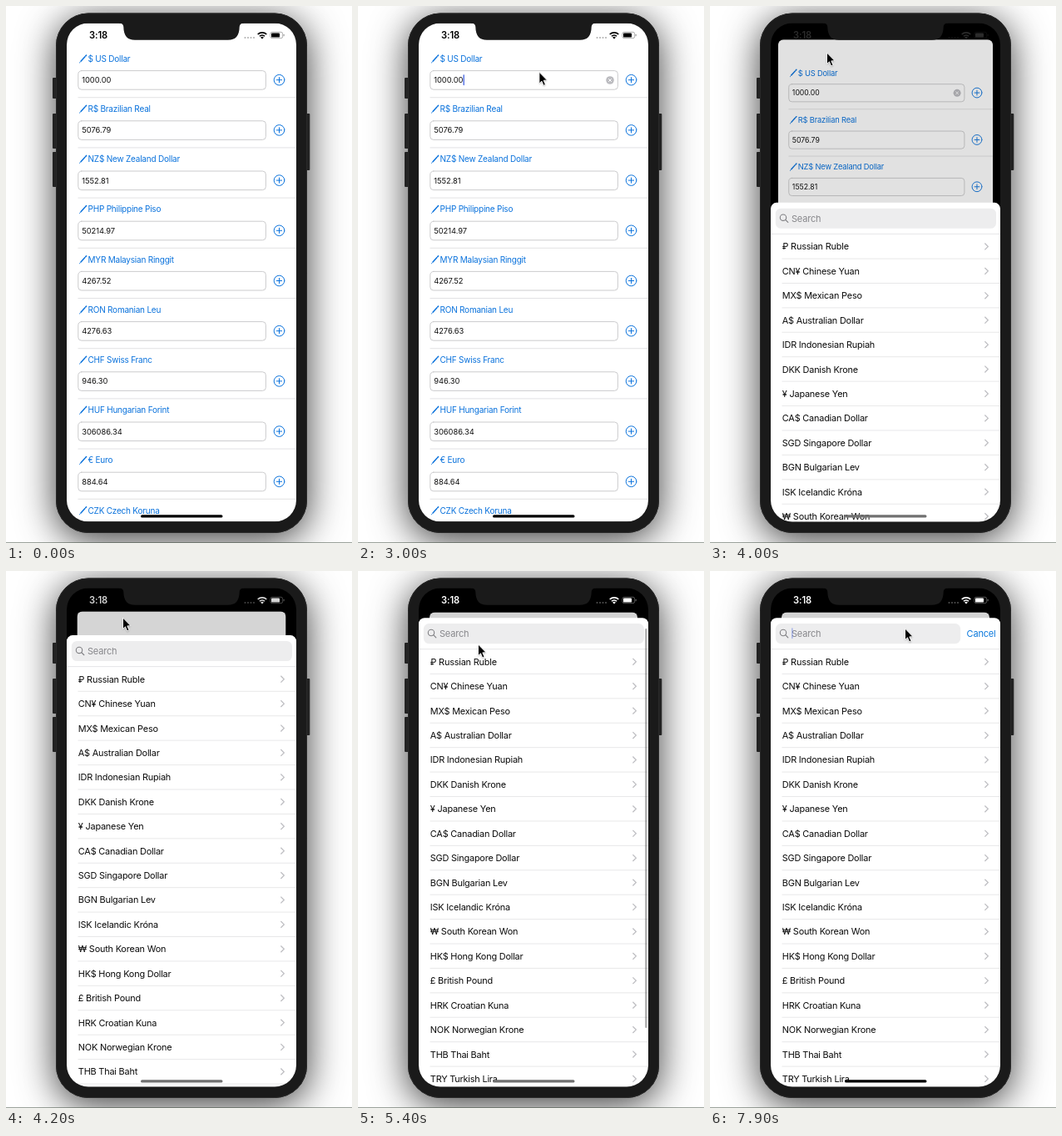
Write an HTML page with a canvas that moves like this. It is 416x644 px and loops after 8 s.

```html
<!DOCTYPE html>
<html lang="en">
<head>
<meta charset="utf-8">
<title>Currency list</title>
<style>
html, body { margin: 0; width: 100%; height: 100%; overflow: hidden; background: #fff; }
canvas { display: block; width: 416px; height: 644px; }
</style>
</head>
<body>
<canvas id="stage" width="416" height="644"></canvas>
<script>
const canvas = document.getElementById('stage');
const ctx = canvas.getContext('2d');
const LOOP = 8000, STEP = 100;
const BLUE = '#0a72dc', CARET = '#3f5fe0', BEZEL = '#1a1a1a';
const SCREEN = { x: 73, y: 20.5, w: 276, h: 598, r: 26 };

const balances = [
  ['$ US Dollar', '1000.00'], ['R$ Brazilian Real', '5076.79'],
  ['NZ$ New Zealand Dollar', '1552.81'], ['PHP Philippine Piso', '50214.97'],
  ['MYR Malaysian Ringgit', '4267.52'], ['RON Romanian Leu', '4276.63'],
  ['CHF Swiss Franc', '946.30'], ['HUF Hungarian Forint', '306086.34'],
  ['€ Euro', '884.64'], ['CZK Czech Koruna', '']
];
const choices = [
  '₽ Russian Ruble', 'CN¥ Chinese Yuan', 'MX$ Mexican Peso', 'A$ Australian Dollar',
  'IDR Indonesian Rupiah', 'DKK Danish Krone', '¥ Japanese Yen', 'CA$ Canadian Dollar',
  'SGD Singapore Dollar', 'BGN Bulgarian Lev', 'ISK Icelandic Króna', '₩ South Korean Won',
  'HK$ Hong Kong Dollar', '£ British Pound', 'HRK Croatian Kuna', 'NOK Norwegian Krone',
  'THB Thai Baht', 'TRY Turkish Lira'
];

// Pointer legs: start, end, from, to
const legs = [
  [900, 1300, [396, 250], [245, 87.5]],
  [2800, 3600, [245, 87.5], [140.5, 56]],
  [5000, 5200, [140.5, 56], [144.5, 88]],
  [6800, 7100, [144.5, 88], [234.5, 69]]
];

const clamp = v => Math.min(1, Math.max(0, v));
const ramp = (t, a, b) => clamp((t - a) / (b - a));
const smooth = v => v * v * (3 - 2 * v);
const mix = (a, b, k) => a + (b - a) * k;

function box(x, y, w, h, r, fill, stroke, width = 1) {
  ctx.beginPath();
  ctx.roundRect(x, y, w, h, r);
  if (fill) { ctx.fillStyle = fill; ctx.fill(); }
  if (stroke) { ctx.strokeStyle = stroke; ctx.lineWidth = width; ctx.stroke(); }
}

function line(points, color, width, cap = 'butt') {
  ctx.beginPath();
  points.forEach(([x, y]) => ctx.lineTo(x, y));
  ctx.strokeStyle = color;
  ctx.lineWidth = width;
  ctx.lineCap = cap;
  ctx.stroke();
}

function circle(x, y, r, fill, stroke, width) {
  ctx.beginPath();
  ctx.arc(x, y, r, 0, Math.PI * 2);
  if (fill) { ctx.fillStyle = fill; ctx.fill(); }
  if (stroke) { ctx.strokeStyle = stroke; ctx.lineWidth = width; ctx.stroke(); }
}

function text(str, x, y, size, color, spacing = 0, weight = 400) {
  ctx.font = `${weight} ${size}px Inter, "Liberation Sans", sans-serif`;
  ctx.letterSpacing = spacing + 'px';
  ctx.fillStyle = color;
  ctx.fillText(str, x, y);
  return ctx.measureText(str).width;
}

function caret(x, y, alpha) {
  ctx.globalAlpha = alpha;
  box(x, y, 1.3, 13, 0.6, CARET);
  ctx.globalAlpha = 1;
}

// One-second blink: shown, a half-faded step, hidden
function blink(t) {
  const phase = (t + 200) % 1000;
  return phase < 600 ? 1 : phase < 700 ? 0.45 : 0;
}

// Critically damped rise of the sheet
function sheetProgress(t) {
  const k = 13.75 * Math.max(0, t - 3829) / 1000;
  return 1 - (1 + k) * Math.exp(-k);
}

function drawBody() {
  ctx.fillStyle = '#fff';
  ctx.fillRect(0, 0, 416, 644);
  ctx.save();
  ctx.shadowColor = 'rgba(0,0,0,.78)';
  ctx.shadowBlur = 46;
  ctx.shadowOffsetY = 8;
  box(60, 8.5, 302, 623.5, 39, BEZEL);
  ctx.restore();
  for (const [y, h] of [[86, 25], [129, 42], [175, 42]]) box(56, y, 5, h, 1, '#222');
  box(361, 129, 4.3, 68, 1, '#222');
  box(60.5, 9, 301, 622.5, 38.5, BEZEL, '#292929');
  ctx.fillStyle = 'rgba(60,75,60,.5)';
  ctx.fillRect(0, 643, 416, 1);
}

function drawNotch() {
  ctx.beginPath();
  ctx.moveTo(136, 19);
  ctx.lineTo(136, 20.5);
  ctx.quadraticCurveTo(141, 20.5, 141.3, 25);
  ctx.bezierCurveTo(141.5, 36, 146, 40.7, 155, 40.7);
  ctx.lineTo(267, 40.7);
  ctx.bezierCurveTo(276, 40.7, 280.5, 36, 280.7, 25);
  ctx.quadraticCurveTo(281, 20.5, 286, 20.5);
  ctx.lineTo(286, 19);
  ctx.fillStyle = BEZEL;
  ctx.fill();
}

function drawStatus(light) {
  const v = Math.round(255 * light);
  const ink = `rgb(${v},${v},${v})`;
  text('3:18', 100, 39.3, 11.2, ink, -0.1, 600);
  ctx.globalAlpha = 0.3;
  for (let i = 0; i < 4; i++) circle(287.5 + i * 3.5, 38, 1.1, ink);
  ctx.globalAlpha = 1;
  for (const r of [5, 8.2]) {
    ctx.beginPath();
    ctx.arc(308, 39.3, r - 0.7, -Math.PI * 0.75, -Math.PI * 0.25);
    ctx.strokeStyle = ink;
    ctx.lineWidth = 1.7;
    ctx.lineCap = 'butt';
    ctx.stroke();
  }
  ctx.beginPath();
  ctx.moveTo(308, 39.6);
  ctx.arc(308, 39.6, 2.7, -Math.PI * 0.75, -Math.PI * 0.25);
  ctx.fillStyle = ink;
  ctx.fill();
  ctx.globalAlpha = 0.4;
  box(317.9, 31.3, 14.8, 7.4, 2.2, null, ink, 0.8);
  box(333.6, 33.7, 1, 2.6, 0.5, ink);
  ctx.globalAlpha = 1;
  box(319, 32.4, 10, 5.2, 1.2, ink);
}

function drawPencil(y) {
  line([[88.2, y + 4.9], [90, y + 3.2]], BLUE, 0.8, 'round');
  line([[89.8, y + 3.3], [95.2, y - 2.7]], BLUE, 1.5);
  line([[95.7, y - 3.2], [96.6, y - 4.2]], BLUE, 1.5, 'round');
}

function drawBalances(t) {
  const focused = t >= 1700;
  balances.forEach(([name, amount], i) => {
    const y = 63.2 + i * 60.2;
    drawPencil(y);
    text(name, 98.5, y + 3.6, 10, BLUE, -0.22);
    box(86.8, y + 14.4, 225.6, 22.6, 4, '#fff', '#c6c6c8', 0.9);
    const w = text(amount, 91.2, y + 29, 9.33, '#111', -0.03);
    circle(328.5, y + 25.5, 6.3, null, BLUE, 1);
    line([[325, y + 25.5], [332, y + 25.5]], BLUE, 1);
    line([[328.5, y + 22], [328.5, y + 29]], BLUE, 1);
    line([[86.5, y + 46.5], [349, y + 46.5]], '#d6d6d8', 0.7);
    if (i === 0 && focused) {
      circle(303, y + 25.8, 4.8, '#bcbcc0');
      line([[301.2, y + 24], [304.8, y + 27.6]], '#fff', 1);
      line([[304.8, y + 24], [301.2, y + 27.6]], '#fff', 1);
      if (t < 3850) caret(91.2 + w + 0.1, y + 19, blink(t));
    }
  });
}

function drawCard(t, p) {
  const s = 1 - 0.094 * p, top = SCREEN.y + 29 * p;
  ctx.save();
  ctx.translate(211, top);
  ctx.scale(s, s);
  ctx.translate(-211, -SCREEN.y);
  ctx.beginPath();
  ctx.roundRect(SCREEN.x, SCREEN.y, SCREEN.w, SCREEN.h, p > 0 ? 7 : 0);
  ctx.clip();
  ctx.fillStyle = '#fff';
  ctx.fillRect(SCREEN.x, SCREEN.y, SCREEN.w, SCREEN.h);
  drawBalances(t);
  ctx.fillStyle = `rgba(0,0,0,${0.17 * p})`;
  ctx.fillRect(SCREEN.x, SCREEN.y, SCREEN.w, SCREEN.h);
  ctx.restore();
}

function drawSheet(t, p) {
  const top = mix(619, 56.2, p);
  const open = smooth(ramp(t, 7150, 7500));
  box(SCREEN.x, top, SCREEN.w, 640, 7, '#fff');
  box(78.8, top + 6.8, mix(265.2, 222.4, open), 24.2, 6.5, '#ededee');
  circle(88, top + 17.8, 3.7, null, '#808084', 1.1);
  line([[90.7, top + 20.5], [93.8, top + 23.6]], '#808084', 1.2, 'round');
  text('Search', 98, top + 22.7, 11, '#87878b', -0.2);
  if (open > 0) {
    ctx.globalAlpha = open;
    text('Cancel', mix(350, 308.6, open), top + 22.7, 11, '#0a78dc', -0.2);
    ctx.globalAlpha = 1;
  }
  if (t >= 7300) caret(98.2, top + 12, blink(t + 500));
  line([[73, top + 37.5], [349, top + 37.5]], '#dcdcde', 0.7);
  choices.forEach((name, i) => {
    const y = top + 52.6 + i * 29.42;
    text(name, 86.8, y + 4, 10.9, '#0c0c0c', -0.2);
    line([[330.4, y - 3.9], [334.3, y], [330.4, y + 3.9]], '#bfbfc3', 1.3);
    line([[86.5, y + 14.6], [349, y + 14.6]], '#dedee0', 0.7);
  });
  const bar = ramp(t, 4600, 4800) * (1 - ramp(t, 5300, 5800));
  if (bar > 0) box(345.2, 69, 2.2, 479, 1.1, `rgba(0,0,0,${0.42 * bar})`);
}

function drawPointer(t) {
  if (t < legs[0][0]) return;
  const [a, b, from, to] = legs.filter(leg => t >= leg[0]).pop();
  const k = smooth(ramp(t, a - STEP, b));
  ctx.save();
  ctx.translate(mix(from[0], to[0], k), mix(from[1], to[1], k));
  ctx.beginPath();
  const outline = [[0, 0], [0, 13.6], [3, 10.8], [5.2, 16], [7.5, 15], [5.3, 9.9], [9.5, 9.7]];
  outline.forEach(([x, y]) => ctx.lineTo(x, y));
  ctx.closePath();
  ctx.shadowColor = 'rgba(0,0,0,.35)';
  ctx.shadowBlur = 2;
  ctx.shadowOffsetY = 1;
  ctx.fillStyle = '#000';
  ctx.fill();
  ctx.shadowColor = 'transparent';
  ctx.strokeStyle = '#fff';
  ctx.lineWidth = 0.9;
  ctx.stroke();
  ctx.restore();
}

function draw(t) {
  const p = sheetProgress(t);
  drawBody();
  ctx.save();
  ctx.beginPath();
  ctx.roundRect(SCREEN.x, SCREEN.y, SCREEN.w, SCREEN.h, SCREEN.r);
  ctx.clip();
  ctx.fillStyle = '#000';
  ctx.fillRect(SCREEN.x, SCREEN.y, SCREEN.w, SCREEN.h);
  drawCard(t, p);
  drawStatus(ramp(t, 3950, 4250));
  if (p > 0) drawSheet(t, p);
  const gray = Math.round(112 * ramp(t, 3800, 4000) * (1 - ramp(t, 7000, 7400)));
  box(162, 610.2, 98.5, 3.4, 1.7, `rgb(${gray},${gray},${gray})`);
  ctx.restore();
  drawNotch();
  drawPointer(t);
}

const start = performance.now();
function tick() {
  const t = (performance.now() - start) % LOOP;
  draw(Math.floor(t / STEP) * STEP);
  requestAnimationFrame(tick);
}
tick();
</script>
</body>
</html>
```
